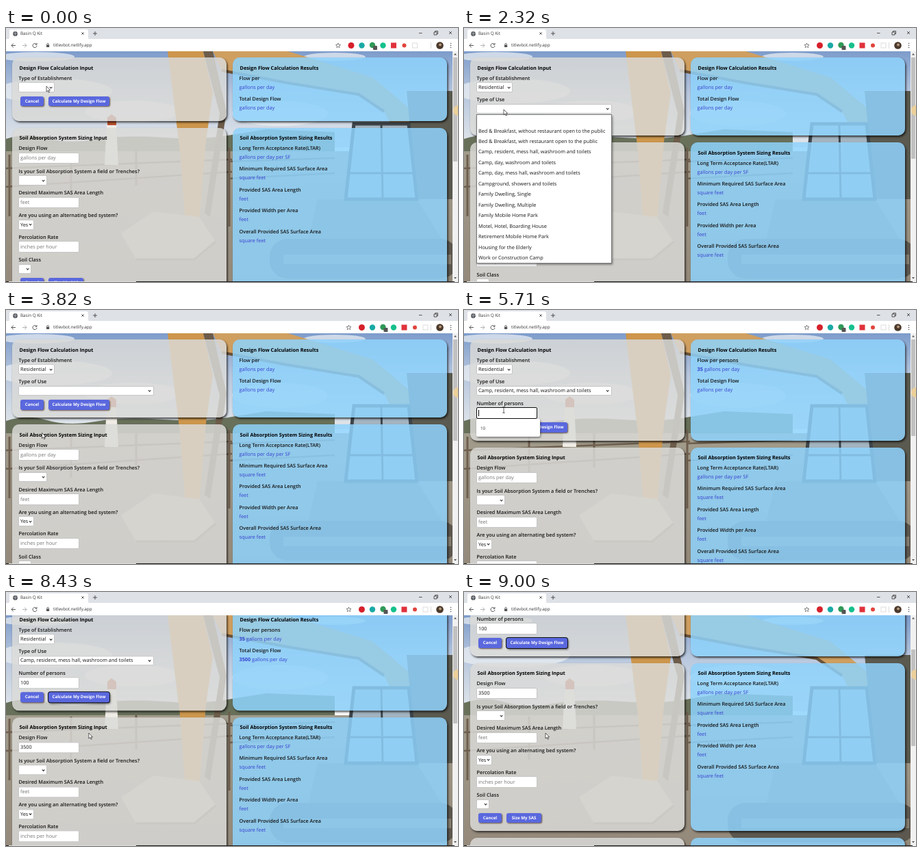
Animation, 660 px wide and 371 px high, one loop 9.04 s. Source, as an HTML page:

```html
<!DOCTYPE html>
<html lang="en">
<head>
<meta charset="utf-8">
<title>Septic sizing form</title>
<style>
html, body { margin: 0; width: 100%; height: 100%; overflow: hidden; }
#stage { position: relative; width: 660px; height: 371px; overflow: hidden; background: #fff;
  font: 7.3px/10px "Open Sans", "Noto Sans", sans-serif; color: #161616; text-rendering: geometricPrecision; }
#stage div { position: absolute; box-sizing: border-box; white-space: pre; }
#stage > svg { position: absolute; left: 0; top: 0; }
#view { left: 0; top: 34px; width: 652px; height: 337px; overflow: hidden; }
#page { left: 0; top: -34px; width: 652px; }
.panel { border-radius: 10px; background: rgba(219,218,216,.84); box-shadow: 1.5px 2px 3px rgba(0,0,0,.7); }
.panel.blue { background: rgba(143,211,252,.85); }
.head { font-weight: 700; color: #000; }
.label { font-weight: 600; }
.value { color: #3740cf; }
.field, .select, .button, .item { display: flex; align-items: center; }
.field, .select { padding: .7px 0 0 2px; background: #fff; border: .7px solid #c6c6c6; border-radius: 2px; }
.hint { color: #777; }
.field.focus { border: 1.6px solid #111; padding-left: 1.4px; }
.select::after { content: ""; position: absolute; box-sizing: border-box; right: 3.2px; top: 4.6px;
  width: 3.2px; height: 3.2px; border: solid #222; border-width: 0 1px 1px 0; transform: rotate(45deg); }
.button { justify-content: center; background: #5a68de; color: #fff; font-size: 6.2px; font-weight: 700;
  border-radius: 3px; box-shadow: 1px 1px 2px rgba(70,45,30,.8); }
.button.focus { box-shadow: 0 0 0 1px #111, 1.5px 2px 3px rgba(0,0,0,.6); }
.menu { background: #fff; border: .7px solid #777; box-shadow: 1px 1.5px 3px rgba(0,0,0,.45); }
.item { left: 0; width: 100%; height: 15.46px; padding: .7px 0 0 2px; }
.item.on { background: #1e90ff; color: #fff; border: 1px solid #124; padding-left: 1px; }
#suggest { border: 0; border-radius: 2px; }
#caret { width: .7px; height: 9px; background: #000; }
.ui { font-size: 6.3px; color: #333; }
#track { left: 652px; top: 34px; width: 8px; height: 337px; background: #f1f1f1; }
#thumb { left: 652.6px; width: 6.6px; background: #c1c1c1; }
#badge { left: 653px; top: 113px; width: 7px; height: 15px; border-radius: 7px 0 0 7px; background: #ecd09a; }
</style>
</head>
<body>
<div id="stage">
  <svg width="660" height="371">
    <defs>
      <linearGradient id="sky" x2="0" y2="1">
        <stop offset="0" stop-color="#7d9ccb"/><stop offset=".45" stop-color="#b9c8de"/><stop offset="1" stop-color="#e2e6ea"/>
      </linearGradient>
      <linearGradient id="soil" x2="0" y2="1">
        <stop offset="0" stop-color="#a29c8c"/><stop offset="1" stop-color="#94897a"/>
      </linearGradient>
      <filter id="soft"><feGaussianBlur stdDeviation=".7"/></filter>
    </defs>
    <rect y="34" width="660" height="140" fill="url(#sky)"/>
    <g filter="url(#soft)">
      <g fill="#eef1f4" opacity=".7">
        <ellipse cx="45" cy="42" rx="55" ry="7"/><ellipse cx="70" cy="92" rx="85" ry="18"/>
        <ellipse cx="185" cy="122" rx="70" ry="16"/><ellipse cx="480" cy="42" rx="45" ry="6"/>
        <ellipse cx="400" cy="125" rx="70" ry="18"/>
      </g>
      <path d="M0 162Q30 152 60 161T130 163T230 160T330 156L380 148L480 152V188H0Z" fill="#68705a"/>
      <rect y="180" width="660" height="195" fill="url(#soil)"/>
      <path d="M0 205L330 192M0 232L330 210M325 195L480 190M325 220L480 212" stroke="#6f5f4e" stroke-width="2.500"/>
      <path d="M5 185V275M95 182V245M190 180V230M326 175V290" stroke="#6f5f4e" stroke-width="3"/>
      <path d="M147 140H161L164 200H144Z" fill="#f0ece6"/>
      <path d="M148 142V131L154 126L161 131V142Z" fill="#b8512f"/>
      <path d="M236 34H288L302 95L292 165L282 285L262 287L254 180Z" fill="#cd964c"/>
      <path d="M288 34L312 125L290 270L298 276L322 122L302 34Z" fill="#6d5c4a"/>
      <path d="M168 300L215 268L282 276L306 312L275 338H190Z" fill="#c3b59d"/>
      <path d="M190 338H275L306 312" fill="none" stroke="#7b6f60" stroke-width="3"/>
      <path d="M302 34H412L535 72L590 118L604 180L580 175L552 122L515 97L410 80L315 62Z" fill="#cf9f60"/>
      <path d="M315 62L410 80L515 97L552 122" fill="none" stroke="#6a5238" stroke-width="4"/>
      <path d="M585 92H660V250H600Z" fill="#5b5a50"/>
      <path d="M455 250H600L640 315H440Z" fill="#7d7769"/>
      <path d="M508 140H588L600 250H496Z" fill="#a3b4c0" stroke="#3e454a" stroke-width="5"/>
      <path d="M548 140L550 250M500 212H596" stroke="#3e454a" stroke-width="3"/>
      <rect x="385" y="308" width="275" height="58" rx="26" fill="#5d584f"/>
      <path d="M405 338H650" stroke="#857d70" stroke-width="14"/>
    </g>
  </svg>
  <div id="view"><div id="page"></div></div>
  <div id="track"></div><div id="thumb"></div><div id="badge"></div>
  <svg width="660" height="371" fill="none">
    <path d="M654 39.500L656 37L658 39.500ZM654 364L656 366.500L658 364Z" fill="#555"/>
    <path d="M0 370.500H655" stroke="#1d1d1d"/><path d="M4 370.500H190" stroke="#ddd"/>
    <rect width="660" height="17" fill="#dee1e6"/>
    <rect y="16" width="660" height="18" fill="#fff"/>
    <path d="M2 17Q5 17 5 13V5Q5 2 8 2H117Q120 2 120 5V13Q120 17 123 17Z" fill="#fff"/>
    <circle cx="13.500" cy="8.500" r="3.400" fill="#55595e"/>
    <path d="M10.500 8H16.500M13.500 5.500V11.500" stroke="#c9ccd0" stroke-width=".6"/>
    <g stroke="#444" stroke-width=".9">
      <path d="M110.300 6.300L113.700 9.700M113.700 6.300L110.300 9.700M127 8H133M130 5V11"/>
      <path d="M603 7.500H607.500M647 5L651 9M651 5L647 9M625 6H629V10H625ZM626.500 6V4.500H630.500V8.500H629"/>
      <path d="M14 25.500H8M10.800 22.500L8 25.500L10.800 28.500"/>
      <path d="M24 25.500H30M27.200 22.500L30 25.500L27.200 28.500" stroke="#aaa"/>
      <path d="M44.200 23.500A3 3 0 1 0 45 26M45 22V24.300H42.700"/>
      <path d="M59.800 25V23.600A1.300 1.300 0 0 1 62.400 23.600V25" stroke-width=".7"/>
    </g>
    <rect x="59" y="24.600" width="4.200" height="3.400" rx=".5" fill="#555"/>
    <g id="icons">
      <path d="M485 22L486 24.400L488.500 24.600L486.600 26.200L487.200 28.700L485 27.300L482.800 28.700L483.400 26.200L481.500 24.600L484 24.400Z" stroke="#555" stroke-width=".7"/>
      <circle cx="504" cy="25.500" r="4.500" fill="#d6202b"/>
      <circle cx="519.500" cy="25.500" r="4.200" fill="#19a9a5"/>
      <circle cx="535" cy="25" r="4.200" fill="#2f9a57"/>
      <rect x="536" y="26" width="6" height="6" rx="1" fill="#555"/>
      <circle cx="550.500" cy="25.500" r="4.200" fill="#15c08c"/>
      <rect x="562" y="21.500" width="8" height="8" fill="#e0313b"/>
      <circle cx="581.500" cy="25.500" r="3" fill="#e0443c"/>
      <rect x="593.500" y="22" width="7" height="7" stroke="#ddd"/>
    </g>
    <path d="M620.500 21V30" stroke="#ccc" stroke-width=".7"/>
    <circle cx="633.500" cy="25.500" r="5.300" fill="#4b392c"/>
    <circle cx="634" cy="24.500" r="2" fill="#b49a7c"/>
    <g fill="#555"><circle cx="649.500" cy="22.500" r=".8"/><circle cx="649.500" cy="25.500" r=".8"/><circle cx="649.500" cy="28.500" r=".8"/></g>
  </svg>
  <div class="ui" style="left:21px;top:3px">Basin Q Kit</div>
  <div class="ui" style="left:69px;top:20px">titlevbot.netlify.app</div>
  <svg id="pointer" width="14" height="14" style="overflow:visible" fill="#fff" stroke="#222" stroke-width=".7">
    <path id="arrow" d="M0 0V8L1.900 6.300L3.200 9.200L4.500 8.600L3.200 5.800H5.700Z"/>
    <path id="beam" d="M-1.800 -4.200H1.800M0 -4.200V4.200M-1.800 4.200H1.800"/>
  </svg>
</div>
<script>
const LOOP = 9040;
const T = { open: 1000, residential: 1750, openUse: 2290, closeUse: 3820, use: 3860,
  focus: 4680, keys: [5820, 5960, 6110], calc: 7250 };
const MOVES = [[40, 59, 85], [320, 60, 84], [1000, 60, 84], [1500, 40, 117], [1930, 40, 117],
  [2280, 58, 119], [2340, 58, 119], [2750, 50, 162], [3110, 48, 163], [3540, 52.5, 179.5],
  [3860, 52.5, 179.5], [4360, 58, 146], [6820, 58, 146], [7200, 112, 171], [7300, 112, 171],
  [7570, 121, 202], [8000, 121, 202], [8300, 121, 206], [9000, 119, 206]];
const SCROLL = [[8330, 0], [8430, 17.5], [8890, 87], [9000, 97]];
const ROW = 15.46;

const $ = id => document.getElementById(id);
const show = (node, on) => { node.style.display = on ? "" : "none"; };
const px = (node, prop, v) => { node.style[prop] = v + "px"; };

function box(parent, cls, x, y, w, h, text = "") {
  const node = document.createElement("div");
  node.className = cls;
  node.textContent = text;
  px(node, "left", x);
  px(node, "top", y);
  if (w) px(node, "width", w);
  if (h) px(node, "height", h);
  return parent.appendChild(node);
}
const text = (parent, cls, x, mid, str) => box(parent, cls, x, mid - 4.5, 0, 0, str);
const field = (parent, y, hint) => box(parent, "field hint", 18, y, 88.5, 16.5, hint);
const select = (parent, y, w, str) => box(parent, "select", 18, y, w, 14.8, str);
const button = (parent, x, y, w, str) => box(parent, "button", x, y, w, 14.8, str);

function row(height) {
  const node = box($("page"), "row", 0, 43);
  node.panels = [box(node, "panel", 9, 0, 313, height), box(node, "panel blue", 331, 0, 312.5, height)];
  return node;
}

function menu(x, y, w, items) {
  const node = box($("page"), "menu", x, y, w, items.length * ROW + 1.4);
  node.items = items.map((s, i) => {
    const item = box(node, "item", 0, i * ROW, 0, 0, s);
    item.mid = y + (i + .5) * ROW;
    return item;
  });
  return node;
}

// flow calculation
const flow = row(92.5);
text(flow, "head", 19.5, 15, "Design Flow Calculation Input");
text(flow, "label", 18.5, 30, "Type of Establishment");
const kind = select(flow, 36, 53);
const useLabel = text(flow, "label", 18.5, 61.5, "Type of Use");
const use = select(flow, 67.5, 197.5);
const countLabel = text(flow, "label", 18.5, 93, "Number of persons");
const count = field(flow, 99, "");
count.classList.remove("hint");
const caret = box(flow, "", 21, 102.7);
caret.id = "caret";
const cancel = button(flow, 21, 0, 34, "Cancel");
const calc = button(flow, 62, 0, 89, "Calculate My Design Flow");
text(flow, "head", 341.5, 15, "Design Flow Calculation Results");
const perLabel = text(flow, "label", 340.5, 30, "");
const per = text(flow, "value", 340.5, 43, "");
text(flow, "label", 340.5, 60.5, "Total Design Flow");
const total = text(flow, "value", 340.5, 73.5, "");

// system sizing
const sizing = row(245.5);
text(sizing, "head", 19.5, 15, "Soil Absorption System Sizing Input");
[["Design Flow", 30], ["Is your Soil Absorption System a field or Trenches?", 63.5],
 ["Desired Maximum SAS Area Length", 95], ["Are you using an alternating bed system?", 128],
 ["Percolation Rate", 159.5], ["Soil Class", 193]].forEach(([s, y]) => text(sizing, "label", 18.5, y, s));
const designFlow = field(sizing, 36, "");
select(sizing, 69.5, 42);
field(sizing, 101, "feet");
select(sizing, 134.3, 23, "Yes");
field(sizing, 165.8, "inches per hour");
select(sizing, 199, 19);
button(sizing, 21, 219, 34, "Cancel");
button(sizing, 62, 219, 51, "Size My SAS");
text(sizing, "head", 341.5, 15, "Soil Absorption System Sizing Results");
[["Long Term Acceptance Rate(LTAR)", "gallons per day per SF"],
 ["Minimum Required SAS Surface Area", "square feet"], ["Provided SAS Area Length", "feet"],
 ["Provided Width per Area", "feet"], ["Overall Provided SAS Surface Area", "square feet"]]
  .forEach(([name, unit], i) => {
    text(sizing, "label", 340.5, 30 + i * 30.4, name);
    text(sizing, "value", 340.5, 43 + i * 30.4, unit);
  });
const more = row(245.5);

const kindMenu = menu(18, 94.5, 53, ["", "Residential", "Commercial", "Institutional"]);
const useMenu = menu(18, 126, 198, ["", "Bed & Breakfast, without restaurant open to the public",
  "Bed & Breakfast, with restaurant open to the public", "Camp, resident, mess hall, washroom and toilets",
  "Camp, day, washroom and toilets", "Camp, day, mess hall, washroom and toilets",
  "Campground, showers and toilets", "Family Dwelling, Single", "Family Dwelling, Multiple",
  "Family Mobile Home Park", "Motel, Hotel, Boarding House", "Retirement Mobile Home Park",
  "Housing for the Elderly", "Work or Construction Camp"]);
const suggest = box($("page"), "menu", 18, 159, 93, 26);
suggest.id = "suggest";
text(suggest, "ui", 6, 13, "10");

function along(keys, t, ease) {
  if (t <= keys[0][0]) return keys[0].slice(1);
  for (let i = 1; i < keys.length; i++) {
    const [a, ...from] = keys[i - 1], [b, ...to] = keys[i];
    if (t < b) {
      const k = ease((t - a) / (b - a));
      return from.map((v, j) => v + (to[j] - v) * k);
    }
  }
  return keys[keys.length - 1].slice(1);
}
const smooth = k => k * k * (3 - 2 * k);
const linear = k => k;

function gallons(node, amount) {
  node.innerHTML = (amount ? `<b>${amount}</b> ` : "") + "gallons per day";
}

function draw(t) {
  const [x, y] = along(MOVES, t, smooth);
  const [scroll] = along(SCROLL, t, linear);
  const step = t < T.residential ? 0 : t < T.use ? 1 : 2;
  const typed = T.keys.filter(k => t >= k).length;
  const done = t >= T.calc;
  const focused = t >= T.focus && !done;

  // form state
  kind.textContent = step ? "Residential" : "";
  use.textContent = step > 1 ? useMenu.items[3].textContent : "";
  [useLabel, use].forEach(n => show(n, step > 0));
  [countLabel, count].forEach(n => show(n, step > 1));
  count.textContent = "100".slice(0, typed);
  count.classList.toggle("focus", focused);
  const lastKey = typed ? T.keys[typed - 1] : T.focus - 30;
  show(caret, focused && Math.floor((t - lastKey) / 530) % 2 === 0);
  px(caret, "left", 21 + typed * 4.18);
  perLabel.textContent = step > 1 ? "Flow per persons" : "Flow per";
  gallons(per, step > 1 ? 35 : 0);
  gallons(total, done ? 3500 : 0);
  designFlow.textContent = done ? "3500" : "gallons per day";
  designFlow.classList.toggle("hint", !done);
  calc.classList.toggle("focus", done);

  // layout
  const height = [92.5, 114, 147.5][step];
  flow.panels.forEach(p => px(p, "height", height));
  [cancel, calc].forEach(b => px(b, "top", [56.5, 88, 121][step]));
  px(sizing, "top", 53 + height);
  px(more, "top", 308.5 + height);
  $("page").style.transform = `translateY(${-scroll}px)`;
  const full = 618.5 + height;
  px($("thumb"), "top", 43 + scroll / full * 321);
  px($("thumb"), "height", 337 / full * 321);

  // popups
  show(kindMenu, t >= T.open && t < T.residential);
  show(useMenu, t >= T.openUse && t < T.closeUse);
  show(suggest, focused && typed < 3);
  [kindMenu, useMenu].forEach(m => m.items.forEach(item =>
    item.classList.toggle("on", Math.abs(y + 1 - item.mid) < ROW / 2)));

  // browser and pointer
  $("icons").setAttribute("transform", `translate(${step ? 15.5 : 0})`);
  const overField = step > 1 && scroll === 0 && x < 106 && y > 142 && y < 158;
  show($("beam"), overField);
  show($("arrow"), !overField);
  $("pointer").style.transform = `translate(${x}px,${y}px)`;
}

const start = performance.now();
function tick() {
  draw((performance.now() - start) % LOOP);
  requestAnimationFrame(tick);
}
tick();
</script>
</body>
</html>
```
